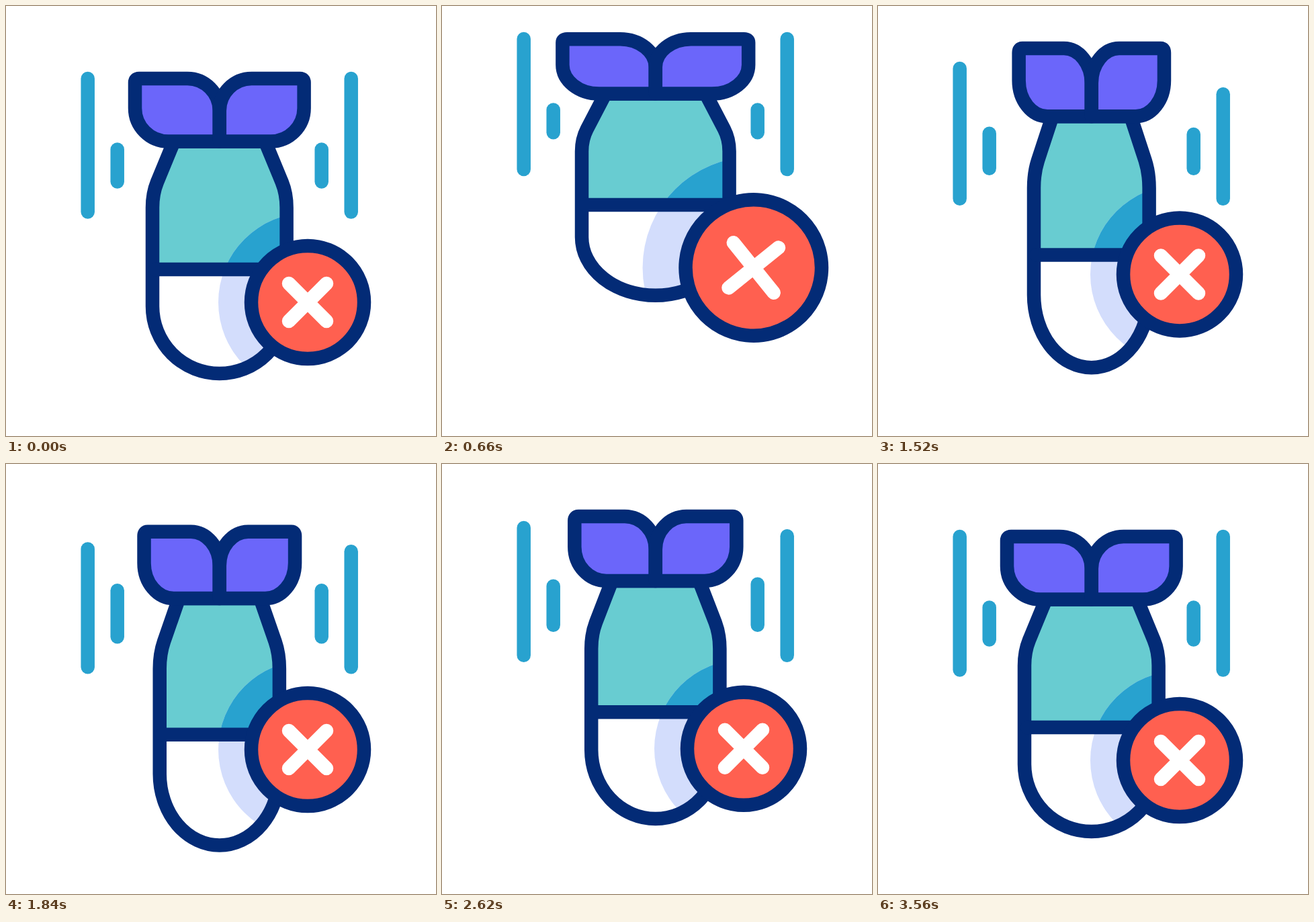
These frames come from a looping animation (640 px wide and 640 px high, 3600 ms). An HTML page:

```html
<!DOCTYPE html>
<html lang="en">
<head>
<meta charset="utf-8">
<title>Falling bomb</title>
<style>
  html, body { margin: 0; width: 100%; height: 100%; overflow: hidden; background: #fff; }
  svg { display: block; width: 640px; height: 640px; }
  .ink, .streak, .cross {
    stroke-width: 20.5; stroke-linecap: round; stroke-linejoin: round;
    vector-effect: non-scaling-stroke;
  }
  .ink { stroke: #032b76; fill: none; }
  .streak { stroke: #28a2cf; }
  .cross { stroke: #fff; fill: none; }
  .fin { fill: #6b66fa; }
  .red { fill: #ff6050; }
</style>
</head>
<body>
<svg viewBox="0 0 640 640">
  <defs>
    <path id="shell" class="ink" d="M250 201.5L225 262C220.5 273 218 286 218 300V447A99.8 100 0 0 0 417.6 447V300C417.6 286 415.1 273 410.6 262L385.6 201.5Z"/>
    <path id="fin" class="ink fin" d="M317.8 201.5V156A48 48 0 0 0 270 108H198Q192 108 192 114V152A49.5 49.5 0 0 0 241.5 201.5Z"/>
    <clipPath id="inBody"><use href="#shell" class="squash"/></clipPath>
    <clipPath id="inTop"><rect class="squash" x="200" y="190" width="236" height="202"/></clipPath>
  </defs>

  <g id="streaks"></g>

  <g clip-path="url(#inBody)">
    <rect class="squash" x="200" y="190" width="236" height="202" fill="#68ccd1"/>
    <circle class="shade" fill="#d3ddfc"/>
    <g clip-path="url(#inTop)"><circle class="shade" fill="#28a2cf"/></g>
  </g>

  <g class="squash">
    <use href="#shell"/>
    <path class="ink" d="M222 392H414"/>
    <use href="#fin"/>
    <use href="#fin" transform="matrix(-1 0 0 1 635.6 0)"/>
  </g>

  <g id="badge">
    <circle class="ink red" r="84"/>
    <path class="cross" d="M-28-28L28 28M28-28L-28 28"/>
  </g>
</svg>

<script>
const LOOP = 3600, START = 120, APEX = 660, DROP = 980, END = 3560;
const PERIOD = 1040, MID = 317.7;

const all = s => document.querySelectorAll(s);
const mix = (a, b, p) => a + (b - a) * p;
const wave = (t, peak) => Math.cos(2 * Math.PI * (t - peak) / PERIOD);

// Smooth step from 0 to 1 between two times.
function ease(t, from, to) {
  const u = Math.min(1, Math.max(0, (t - from) / (to - from)));
  return (1 - Math.cos(Math.PI * u)) / 2;
}

// Eased value through a few [time, value] points, starting at rest.
function through(t, rest, ...points) {
  let from = START, v = rest;
  for (const [to, next] of points) {
    v = mix(v, next, ease(t, from, to));
    from = to;
  }
  return v;
}

// Steady bobbing that dies away just before the loop ends.
const calm = t => 1 - ease(t, END - 200, END);
const sway = (t, peak, size, mean) => (mean + size * wave(t, peak)) * calm(t);

function bombY(t) {
  return t < 1502
    ? through(t, 0, [670, -87.5], [DROP, 30], [1290, -30], [1502, -27])
    : sway(t, 2022, 23, -4);
}

function badgeY(t) {
  return t < 2130
    ? through(t, 0, [APEX, -51.5], [DROP, -22], [1580, -42], [2130, 14.6])
    : sway(t, 2130, 16, -1.4);
}

function streakY(t) {
  return t < 1080 ? through(t, 0, [APEX, -59], [1080, 18]) : sway(t, 2120, 20, -2);
}

// Squash on the way up, stretch in the drop, then a slow recovery.
function bombScale(t, squash, stretch) {
  const left = Math.min(1, Math.max(0, (END - t) / (END - DROP)));
  return 1 + through(t, 0, [APEX, squash], [DROP, stretch]) * Math.pow(left, t < DROP ? 0 : 1.55);
}

// Each streak is wiped upwards, then grows back and keeps changing length.
const long = { y: 108, len: 198.5, wipe: 640 };
const short = { y: 213.5, len: 48, wipe: 580 };
const streaks = [
  { ...long, x: MID - 196, grow: 1060, mean: 11, size: 12 },
  { ...short, x: MID - 152, grow: 1160, mean: -11.5, size: -9.5 },
  { ...short, x: MID + 152, grow: 1200, mean: -14, size: -7 },
  { ...long, x: MID + 196, grow: 1200, mean: 22, size: 4.5 }
];

for (const s of streaks) {
  s.el = document.createElementNS('http://www.w3.org/2000/svg', 'line');
  s.el.setAttribute('class', 'streak');
  document.getElementById('streaks').append(s.el);
}

const squashed = all('.squash'), shades = all('.shade');
const badge = document.getElementById('badge');

function set(el, attrs) {
  for (const name in attrs) el.setAttribute(name, attrs[name]);
}

function drawStreak(s, t) {
  const y = s.y + streakY(t);
  let top = y, bottom = y + s.len;
  if (t < 1000) {
    bottom -= s.len * ease(t, s.wipe, s.wipe + 220);
  } else {
    top += mix(s.len, sway(t, 1870, s.size, s.mean), ease(t, s.grow, s.grow + 420));
  }
  set(s.el, { x1: s.x, x2: s.x, y1: top, y2: bottom, visibility: bottom - top > .1 ? 'visible' : 'hidden' });
}

function draw(t) {
  const sx = bombScale(t, .1, -.202), sy = bombScale(t, -.131, .119);
  const transform = `translate(317.8 ${327.5 + bombY(t)}) scale(${sx} ${sy}) translate(-317.8 -327.5)`;
  squashed.forEach(el => set(el, { transform }));

  const grow = through(t, 0, [APEX, .205], [DROP, .293], [1500, 0]);
  const turn = through(t, 0, [APEX, 6.2], [DROP, 6.2], [1500, 0]);
  const cx = 449 + 72 * grow, cy = 441 + badgeY(t);
  set(badge, { transform: `translate(${cx} ${cy}) rotate(${turn}) scale(${1 + grow})` });
  shades.forEach(el => set(el, { cx, cy, r: 133 + 157 * grow }));

  streaks.forEach(s => drawStreak(s, t));
}

const start = performance.now();
function tick() {
  draw((performance.now() - start) % LOOP);
  requestAnimationFrame(tick);
}
tick();
</script>
</body>
</html>
```
